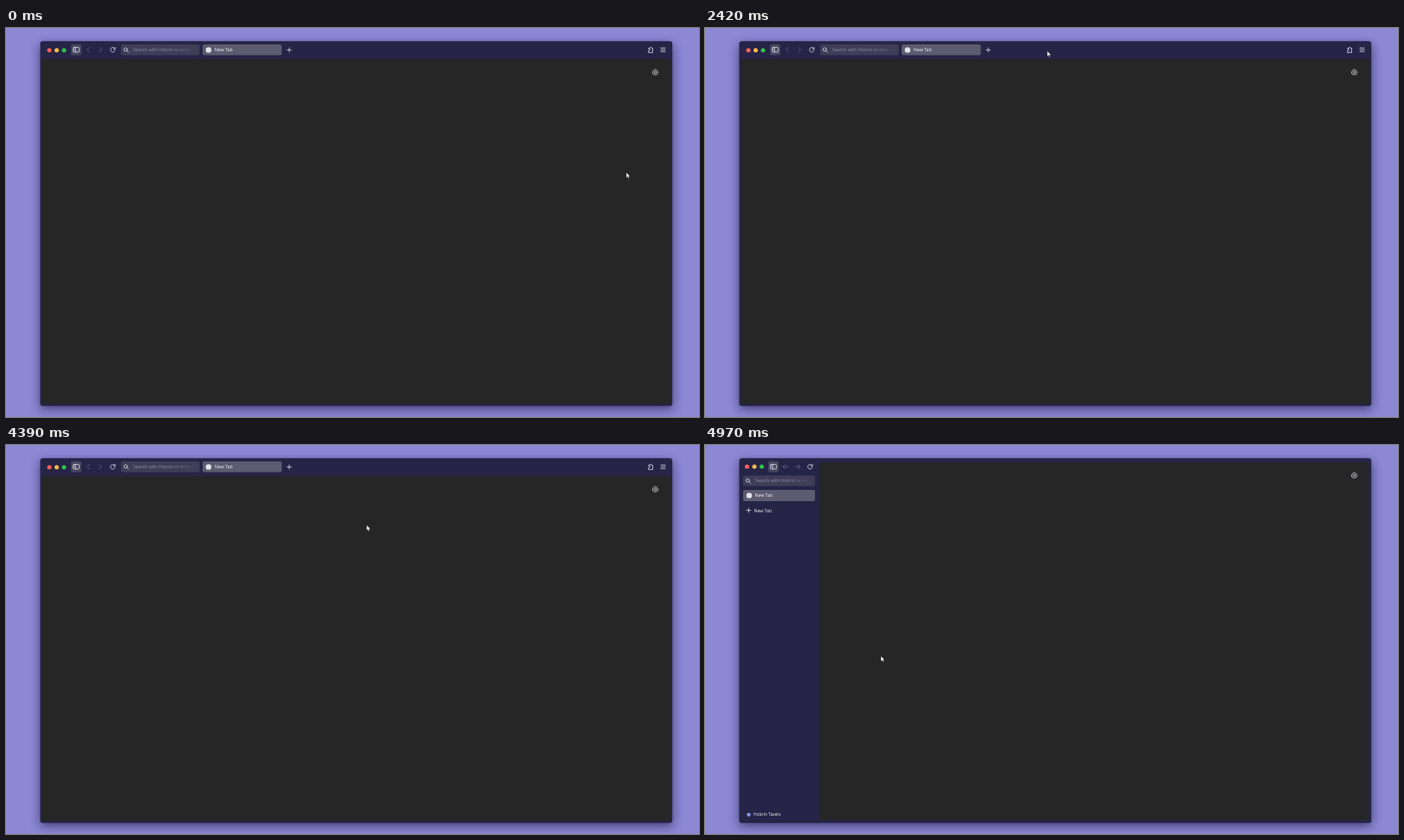
An HTML page for the animation above (5 s loop, 800 px wide and 450 px high).

```html
<!DOCTYPE html>
<html lang="en">
<head>
<meta charset="utf-8">
<title>Vertical tabs</title>
<style>
  html, body { margin: 0; width: 100%; height: 100%; overflow: hidden; background: #8d88d4; }
  svg { display: block; width: 100vw; height: 100vh; }
  text { font: 5.2px "Open Sans", "Noto Sans", sans-serif; fill: #f4f4f8; }
  .menu text { font-size: 4.85px; }
  .menu text.off { fill: #747476; }
  .u { text-decoration: underline; text-decoration-thickness: .4px; }
  .line { fill: none; stroke: #dcdbe6; stroke-width: .8; stroke-linecap: round; stroke-linejoin: round; }
  .dim { stroke: #69677f; }
</style>
</head>
<body>
<svg viewBox="0 0 800 450" preserveAspectRatio="none">
  <defs>
    <filter id="blur" x="-10%" y="-10%" width="120%" height="120%"><feGaussianBlur stdDeviation="6"/></filter>
    <linearGradient id="fadeH" gradientUnits="userSpaceOnUse" x1="195" x2="220">
      <stop stop-color="#8f8da2"/><stop offset="1" stop-color="#8f8da2" stop-opacity="0"/>
    </linearGradient>
    <linearGradient id="fadeV" gradientUnits="userSpaceOnUse" x1="98" x2="123">
      <stop stop-color="#8f8da2"/><stop offset="1" stop-color="#8f8da2" stop-opacity="0"/>
    </linearGradient>
  </defs>
  <rect width="800" height="450" fill="#8d88d4"/>
  <rect x="39" y="19" width="731" height="422" rx="4" fill="#1d1940" opacity=".62" filter="url(#blur)"/>
  <rect x="39.5" y="15.3" width="729.7" height="422" rx="3" fill="#262447"/>
  <rect id="page" fill="#262626"/>
  <g id="horizontal"></g>
  <g id="vertical"></g>
  <g id="gear" class="line"></g>
  <g id="menu" class="menu"></g>
  <path id="cursor" d="M0 0V6.4L1.5 5.1L2.5 7.3L3.6 6.8L2.6 4.7H4.6Z" fill="#fff" stroke="#111" stroke-width=".45"/>
</svg>
<script>
const LOOP = 5000, MENU_OPEN = 2880, MENU_CLOSE = 3860, SWITCH = 4420;
const $ = id => document.getElementById(id);
const clamp = v => Math.max(0, Math.min(1, v));

const box = (x, y, w, h, fill, r = 2) =>
  `<rect x="${x}" y="${y}" width="${w}" height="${h}" rx="${r}" fill="${fill}"/>`;
const disc = (x, y, r, fill) => `<circle cx="${x}" cy="${y}" r="${r}" fill="${fill}"/>`;
const label = (x, y, s, attrs = "") => `<text x="${x}" y="${y}" ${attrs}>${s}</text>`;
const icon = (x, y, d, cls = "") =>
  `<path class="line ${cls}" transform="translate(${x} ${y})" d="${d}"/>`;

const SHAPES = {
  panel: "M-2.6 -2.7H2.6Q3.4 -2.7 3.4 -1.9V1.9Q3.4 2.7 2.6 2.7H-2.6Q-3.4 2.7 -3.4 1.9V-1.9Q-3.4 -2.7 -2.6 -2.7ZM-.8 -2.7V2.7M-2.3 -1.2H-1.9M-2.3 .3H-1.9",
  prev: "M1.2 -2.6L-1.4 0L1.2 2.6",
  next: "M-1.2 -2.6L1.4 0L-1.2 2.6",
  left: "M3 0H-3M-.4 -2.6L-3 0L-.4 2.6",
  right: "M-3 0H3M.4 -2.6L3 0L.4 2.6",
  reload: "M2.1 -1.8A2.7 2.7 0 1 0 2.7 .5M2.7 -2.8V-.9H.8",
  search: "M1.2 -.5A1.9 1.9 0 1 1 -2.6 -.5A1.9 1.9 0 1 1 1.2 -.5M.7 .9L2.6 2.8",
  plus: "M-2.4 0H2.4M0 -2.4V2.4",
  bars: "M-2.5 -2.1H2.5M-2.5 0H2.5M-2.5 2.1H2.5",
  addon: "M-2.3 2.8V.9H-1.5A1 1 0 0 0 -1.5 -1.1H-2.3V-1.9H-.7A1 1 0 1 1 1.3 -1.9H2.5V2.8Z"
};

const lights = (x, y) =>
  ["#ff6159", "#f8bd45", "#2fc24a"].map((c, i) => disc(x + i * 8.5, y, 2.5, c)).join("");
const panelButton = x => box(x - 6, 18.7, 12, 12.8, "#48465f") + icon(x, 25.1, SHAPES.panel);
const PROMPT = "Search with Hobrin or enter ad";

$("horizontal").innerHTML =
  lights(50, 25.8) + panelButton(81) +
  icon(95, 25.1, SHAPES.prev, "dim") + icon(109, 25.1, SHAPES.next, "dim") +
  icon(123.3, 25.2, SHAPES.reload) +
  box(132.7, 19, 91, 12.6, "#3f3d58") + icon(138.9, 25.3, SHAPES.search) +
  label(147, 27.2, PROMPT, 'fill="url(#fadeH)" style="fill:url(#fadeH)"') +
  box(227, 19, 91.3, 12.6, "#5d5b6f") + disc(233.8, 25.4, 3.2, "#e4e3ea") +
  label(241, 27.3, "New Tab") + icon(327, 25.4, SHAPES.plus) +
  icon(744, 25.2, SHAPES.addon) + icon(758.5, 25.2, SHAPES.bars);

$("vertical").innerHTML =
  lights(48.5, 25) + panelButton(79) +
  icon(93, 25.2, SHAPES.left, "dim") + icon(107, 25.2, SHAPES.right, "dim") +
  icon(121.3, 25.2, SHAPES.reload) +
  box(44, 35.2, 83, 12.4, "#3f3d58") + icon(50, 41.5, SHAPES.search) +
  label(58, 43.2, PROMPT, 'style="fill:url(#fadeV)"') +
  box(44, 52, 83, 13, "#5d5b6f") + disc(51, 58.4, 3.2, "#e4e3ea") +
  label(57.5, 60.2, "New Tab") + icon(50.4, 75.6, SHAPES.plus) +
  label(56.5, 77.6, "New Tab") +
  disc(50.5, 427.6, 2.2, "#8f92e6") + label(56, 429.4, "Hobrin Tavelo", 'style="font-size:4.9px"');

const hex = Array.from({ length: 12 }, (_, i) => {
  const a = (i * 30 + 15) * Math.PI / 180, r = i % 4 < 2 ? 3.2 : 2.9;
  return `${(r * Math.cos(a)).toFixed(2)},${(r * Math.sin(a)).toFixed(2)}`;
}).join(" ");
$("gear").innerHTML = `<polygon points="${hex}"/><circle r="1.2"/>`;

// Access keys are marked with an underscore before the letter.
const ITEMS = [
  [37, "Ne_w Tab"], [49.8, "_Reload Selected Tab"], [59, "Bookmark Selected _Tab..."],
  [68.3, "_Select All Tabs", "off"], [77.4, "Re_open Closed Tab"],
  [90.3, "Turn on Vertical Tabs"], [99.6, "_Menu Bar"],
  [109.5, "_Bookmarks Toolbar"], [123.3, "_Customise Toolbar..."]
];
$("menu").innerHTML =
  `<rect x="387.8" y="29.5" width="80" height="100.3" rx="1.5" fill="#262627" stroke="#353538" stroke-width=".7"/>` +
  `<rect id="hover" x="390.5" width="74.5" height="9.2" rx="1.2" fill="#3b3b3e"/>` +
  [43.4, 83.8, 116.4].map(y => box(397, y, 64, .6, "#363638", 0)).join("") +
  ITEMS.map(([y, s, cls = ""]) =>
    label(405, y + 1.8, s.replace(/_(.)/, '<tspan class="u">$1</tspan>'), `class="${cls}"`)).join("") +
  icon(457, 109.3, "M-1.1 -2.2L1.1 0L-1.1 2.2");

// Pointer path: time, x, y.
const PATH = [
  [0, 716, 167], [440, 716, 167], [600, 640, 130], [760, 470, 62], [880, 385, 36],
  [970, 348, 29], [1060, 331, 38], [1150, 342, 51], [1250, 385, 45], [1340, 414, 33],
  [1450, 402, 24], [1540, 402, 24], [1590, 401, 24], [1780, 401, 24], [1890, 399, 26],
  [2200, 399, 26], [2420, 395, 26.5], [2740, 395, 26.5], [2850, 387, 28], [3180, 387, 28],
  [3270, 387, 35], [3330, 388, 51], [3420, 381, 78], [3520, 386, 108], [3620, 398, 114],
  [3740, 412, 98], [3820, 415.5, 92], [4360, 415.5, 92], [4550, 419.5, 106.5], [4640, 385, 122],
  [4780, 275, 165], [4910, 211, 228], [4970, 203, 244], [5000, 203, 244]
];

function slope(i, k) {
  const a = PATH[i - 1], p = PATH[i], b = PATH[i + 1];
  const still = q => q[1] === p[1] && q[2] === p[2];
  return !a || !b || still(a) || still(b) ? 0 : (b[k] - a[k]) / (b[0] - a[0]);
}

function pointer(t) {
  let i = 0;
  while (i < PATH.length - 2 && t >= PATH[i + 1][0]) i++;
  const a = PATH[i], b = PATH[i + 1], d = b[0] - a[0], u = (t - a[0]) / d;
  const s = u * u * (3 - 2 * u), h = u * (1 - u) * (1 - u), g = u * u * (u - 1);
  return [1, 2].map(k => a[k] + (b[k] - a[k]) * s + d * (h * slope(i, k) + g * slope(i + 1, k)));
}

const set = (el, attrs) => { for (const k in attrs) el.setAttribute(k, attrs[k]); };
const show = (id, on) => set($(id), { visibility: on ? "visible" : "hidden" });

function render(t) {
  const side = t >= SWITCH;
  show("horizontal", !side);
  show("vertical", side);

  const top = 20 + 16 * (1 - clamp((t - SWITCH) / 300)) ** 3;
  const left = side ? 132 : 41.3, right = side ? 766 : 767.5, bottom = side ? 434 : 434.7;
  set($("page"), { x: left, y: top, width: right - left, height: bottom - top, rx: side ? 2 : 0 });
  set($("gear"), { transform: `translate(749.5 ${top + 15.2})` });

  const [x, y] = pointer(t);
  set($("cursor"), { transform: `translate(${x} ${y})` });

  const alpha = clamp((t - MENU_OPEN) / 60) * clamp((MENU_CLOSE + 40 - t) / 40);
  set($("menu"), { opacity: alpha });
  const row = ITEMS.find(r => !r[2] && Math.abs(y - r[0]) < 4.6);
  const hovered = alpha > 0 && x > 391 && row;
  set($("hover"), { y: row ? row[0] - 4.6 : 0, opacity: hovered ? 1 : 0 });
}

const start = performance.now();
function tick() {
  render((performance.now() - start) % LOOP);
  requestAnimationFrame(tick);
}
tick();
</script>
</body>
</html>
```
